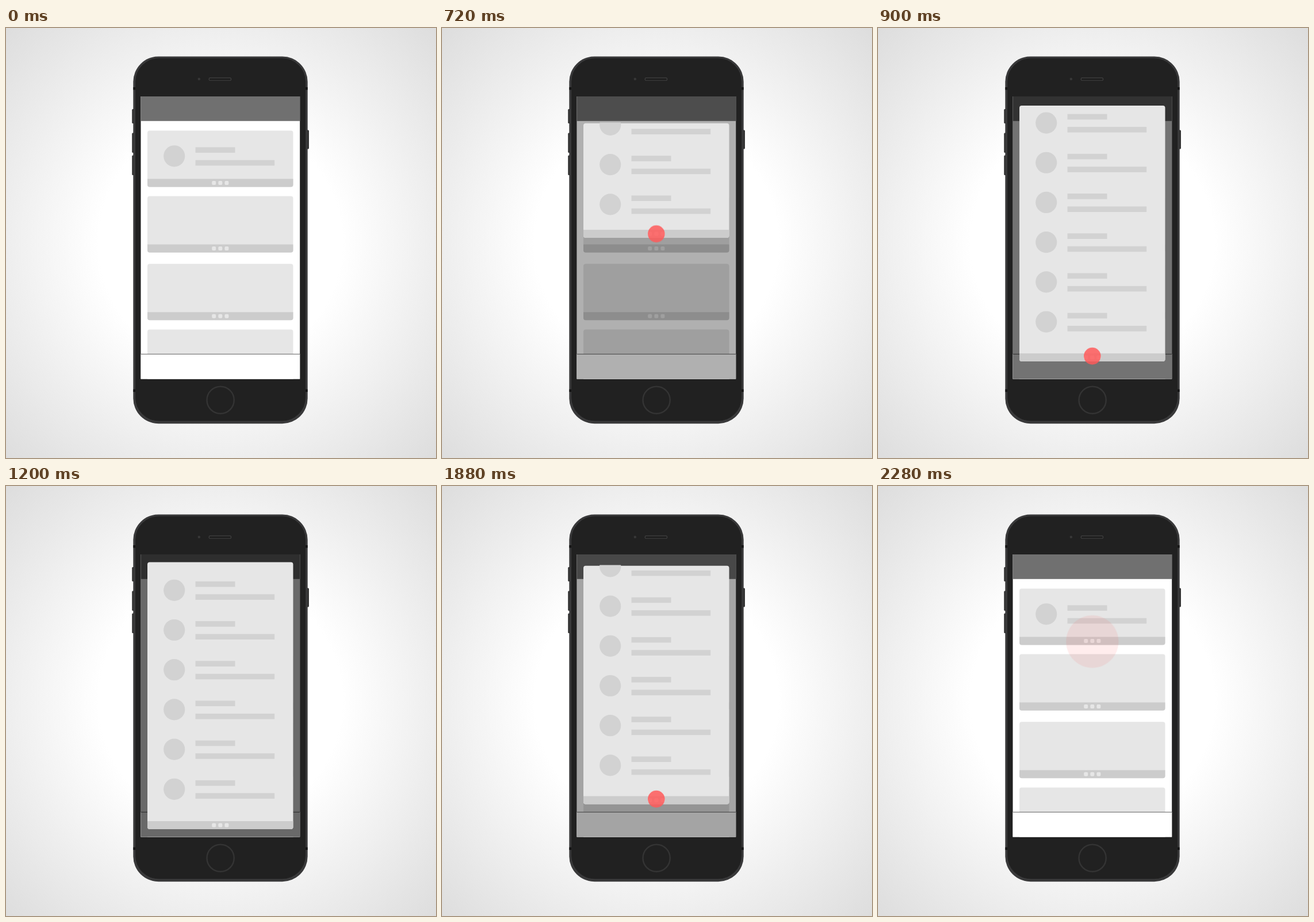
Write an HTML page that moves like this. It is 748 by 748 pixels and loops after 3620 ms.

```html
<!DOCTYPE html>
<html lang="en">
<head>
<meta charset="utf-8">
<title>Expanding card</title>
<style>
  @property --open  { syntax: "<number>"; inherits: true; initial-value: 0; }
  @property --shade { syntax: "<number>"; inherits: true; initial-value: 0; }

  html, body { margin: 0; width: 100%; height: 100%; overflow: hidden; background: #fff; }
  svg {
    display: block; width: 100%; height: 100%;
    --ease: cubic-bezier(.333, 0, .667, 1);
    animation: open 3620ms var(--ease) infinite,
               shade 3620ms cubic-bezier(.2, .5, .67, .85) infinite;
  }

  /* drag down 600-950 ms, drag up 1800-2150 ms */
  @keyframes open {
    0%, 16.575% { --open: 0; }
    26.243%, 49.724% { --open: 1; }
    59.392%, 100% { --open: 0; }
  }
  @keyframes shade {
    0%, 16.575% { --shade: 0; }
    26.243%, 49.724% { --shade: .59; }
    59.392%, 100% { --shade: 0; }
  }
  @keyframes fade {
    0%, 10.497% { opacity: 0; }
    13.812%, 26.243% { opacity: .85; }
    30.387%, 46.409% { opacity: 0; }
    49.724%, 59.392% { opacity: .85; }
    62.983%, 100% { opacity: .11; }
  }
  @keyframes press {
    0%, 10.497% { transform: scale(3.2); }
    13.812%, 26.243% { transform: scale(1); }
    30.387%, 46.409% { transform: scale(3.2); }
    49.724%, 59.392% { transform: scale(1); }
    62.983%, 100% { transform: scale(3.08); }
  }

  .panel {
    y: calc(178.5px - 46px * var(--open));
    height: calc(98px + 366.5px * var(--open));
  }
  .reveal {
    y: calc(177.3px - 46px * var(--open));
    height: calc(98px + 366.5px * var(--open));
  }
  .list   { transform: translateY(calc(304.5px * var(--open))); }
  .handle { transform: translateY(calc(320.5px * var(--open))); }
  .finger { transform: translateY(calc(317px * var(--open))); }
  .shade  { opacity: var(--shade); }
  .touch {
    transform-origin: 372.8px 270.6px;
    animation: fade 3620ms linear infinite, press 3620ms var(--ease) infinite;
  }
</style>
</head>
<body>
<svg viewBox="0 0 748 748">
  <defs>
    <radialGradient id="glow" gradientUnits="userSpaceOnUse" cx="373" cy="374" r="529">
      <stop offset=".4" stop-color="#fff"/>
      <stop offset="1" stop-color="#ddd"/>
    </radialGradient>
    <clipPath id="screen"><rect x="234.5" y="119" width="276.7" height="491.5"/></clipPath>
    <clipPath id="reveal"><rect class="reveal" x="246" width="253.5"/></clipPath>

    <g id="bar">
      <path d="M246 262.5h253.5v10q0 4-4 4h-245.500q-4 0-4-4z" fill="#ccc"/>
      <g fill="#e6e6e6">
        <rect x="358.200" y="266" width="7" height="7" rx="2"/>
        <rect x="369.300" y="266" width="7" height="7" rx="2"/>
        <rect x="380.400" y="266" width="7" height="7" rx="2"/>
      </g>
    </g>
    <g id="card">
      <rect x="246" y="178.5" width="253.5" height="98" rx="4" fill="#e6e6e6"/>
      <use href="#bar"/>
    </g>
    <g id="row" fill="#d2d2d2">
      <circle cx="292.7" cy="222.8" r="18.6"/>
      <rect x="329.5" y="207.4" width="69" height="9.6"/>
      <rect x="329.5" y="229.800" width="137.7" height="9.6"/>
    </g>
  </defs>

  <rect width="748" height="748" fill="url(#glow)"/>

  <!-- phone -->
  <g fill="#333">
    <rect x="219.2" y="141" width="5" height="25" rx="1.5"/>
    <rect x="219.2" y="182.5" width="5" height="34.5" rx="1.5"/>
    <rect x="219.2" y="221.5" width="5" height="34.5" rx="1.5"/>
    <rect x="522" y="177.5" width="5" height="33" rx="1.5"/>
  </g>
  <rect x="221.3" y="49.5" width="303.4" height="638.7" rx="44" fill="#39393a"/>
  <g fill="#161616">
    <rect x="221.3" y="103" width="303.4" height="4.5"/>
    <rect x="221.3" y="628.5" width="303.4" height="4.5"/>
  </g>
  <rect x="225" y="52.5" width="296.2" height="631" rx="41" fill="#212121"/>
  <circle cx="335.8" cy="88.800" r="2.2" fill="#383838"/>
  <rect x="353.2" y="86.700" width="38.4" height="4.4" rx="2.2" fill="#1c1c1c" stroke="#3c3c3c" stroke-width="1.4"/>
  <circle cx="373.1" cy="647.2" r="23.6" fill="none" stroke="#343434" stroke-width="2.4"/>

  <!-- app -->
  <g clip-path="url(#screen)">
    <rect x="234" y="119" width="278" height="492" fill="#fff"/>
    <use href="#card" y="114.1"/>
    <use href="#card" y="231.8"/>
    <use href="#card" y="346"/>
    <rect x="234" y="567" width="278" height="44" fill="#fff"/>
    <rect x="234" y="566.800" width="278" height="1" fill="#606060"/>
    <rect x="234" y="119" width="278" height="42.8" fill="#707070"/>
    <rect class="shade" x="234" y="119" width="278" height="492"/>

    <rect class="panel" x="246" width="253.5" rx="4" fill="#e6e6e6"/>
    <g clip-path="url(#reveal)">
      <g class="list">
        <use href="#row"/>
        <use href="#row" y="-69.2"/>
        <use href="#row" y="-138.4"/>
        <use href="#row" y="-207.6"/>
        <use href="#row" y="-276.8"/>
        <use href="#row" y="-346"/>
      </g>
    </g>
    <use class="handle" href="#bar"/>
  </g>

  <g class="finger">
    <circle class="touch" cx="372.8" cy="270.6" r="14.8" fill="#ff5a5a"/>
  </g>
</svg>
</body>
</html>
```
